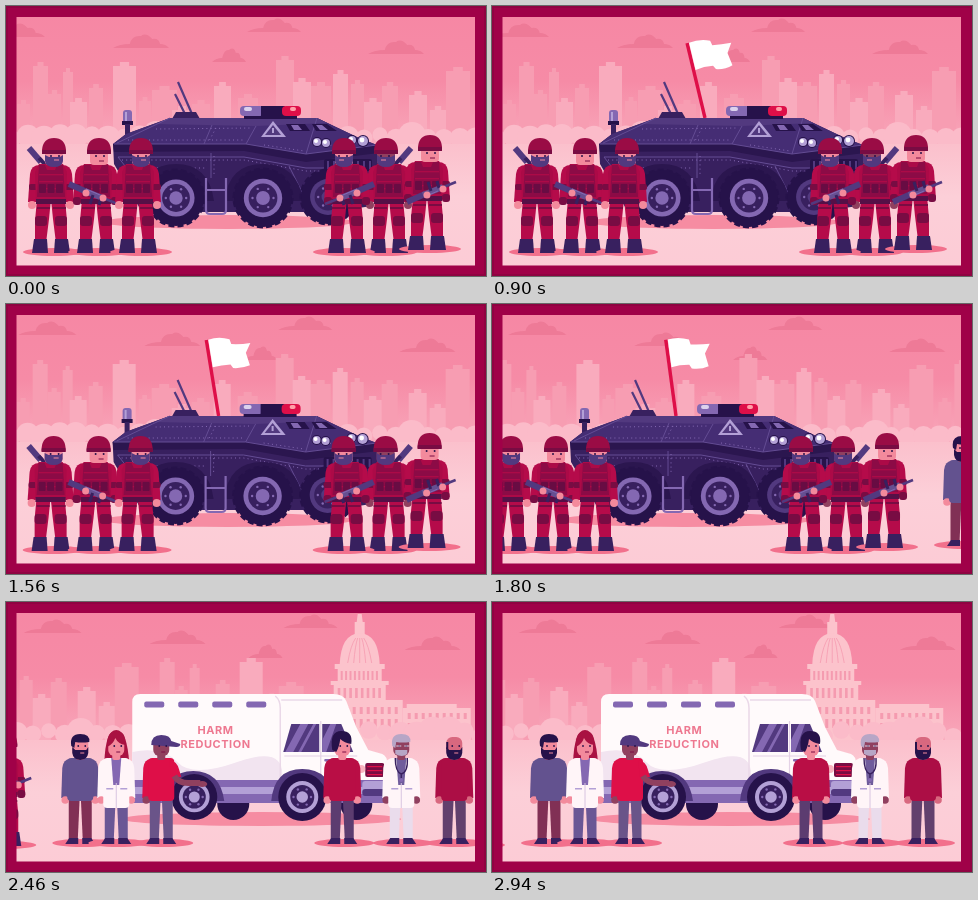
An HTML page that plays this animation: 480x270 px, repeating every 3 s.

```html
<!DOCTYPE html>
<html lang="en">
<head>
<meta charset="utf-8">
<title>Harm reduction</title>
<style>
html,body{margin:0;width:100%;height:100%;overflow:hidden;background:#a00148}
svg{display:block;width:100vw;height:100vh}
text{font:700 11px Inter,"Open Sans",sans-serif;letter-spacing:.55px;text-anchor:middle;fill:#ee7890}
</style>
</head>
<body>
<svg id="stage" viewBox="0 0 480 270"></svg>
<script>
const LOOP = 3000, STEP = 60, TRAVEL = 442;
const ink = '#26124a', navy = '#38205f', plum = '#52397f', mauve = '#8468b2', lilac = '#b3a0d6';
const wine = '#780c43', crimson = '#ac0a47', red = '#de0f48', skin = '#f38a9c', brown = '#90405f';

// Shape helpers
const rect = (x, y, w, h, f, rx = 0) => `<rect x="${x}" y="${y}" width="${w}" height="${h}" rx="${rx}" fill="${f}"/>`;
const path = (d, f) => `<path d="${d}" fill="${f}"/>`;
const line = (d, s, w = 1, more = '') => `<path d="${d}" fill="none" stroke="${s}" stroke-width="${w}" ${more}/>`;
const oval = (x, y, rx, ry, f) => `<ellipse cx="${x}" cy="${y}" rx="${rx}" ry="${ry}" fill="${f}"/>`;
const disc = (x, y, r, f) => oval(x, y, r, r, f);
const group = (body, at = '', id = '') => `<g ${id && `id="${id}"`} ${at && `transform="${at}"`}>${body}</g>`;
const times = (n, f) => Array.from({length: n}, (_, i) => f(i)).join('');

let seed = 7;
const rand = () => (seed = seed * 16807 % 2147483647) / 2147483647;

function cloud(x, y, w) {
  return path(`M${x - w / 2} ${y + 6}q${w * .12} -4 ${w * .3} -4q2 -9 ${w * .2} -8q5 -4 ${w * .2} 3q${w * .12} -1 ${w * .14} 5q${w * .1} 0 ${w * .16} 4z`, '#ee7a97');
}

function skyline() {
  const far = [[11, 98, 13], [27, 60, 15], [42, 88, 13], [57, 66, 10], [83, 82, 14], [133, 95, 12], [146, 84, 25],
    [186, 98, 18], [232, 92, 20], [270, 54, 18], [305, 80, 20], [345, 78, 13], [376, 80, 16], [440, 65, 24]];
  const near = [[64, 96, 17], [107, 60, 23], [166, 104, 20], [208, 80, 17], [287, 76, 18], [327, 68, 15], [358, 96, 18], [403, 89, 18], [424, 104, 16]];
  const row = (list, fill) => [0, 458].map(o => list.filter(b => b[0] + o < 640)
    .map(([x, y, w]) => rect(x + o, y, w, 150 - y, fill) + rect(x + o + w * .3, y - 4, w * .4, 5, fill)).join('')).join('');
  return row(far, '#f79db2') + row(near, '#f9abbd');
}

function capitol() {
  const pale = '#fcc3cc', shade = '#f59bb0';
  return path('M-2 12h4l1 8h2v13h-10v-13h2z', pale) + path('M-20 63q1 -31 20 -32q19 1 20 32z', pale) +
    times(5, i => line(`M${-12 + i * 6} 61Q${-9 + i * 4.5} 43 ${-4 + i * 2} 36`, shade, .8)) +
    rect(-25, 62, 50, 5, pale) + rect(-22, 67, 44, 13, pale) + times(9, i => rect(-19 + i * 4.4, 69, 2, 9, shade)) +
    rect(-29, 79, 58, 4, pale) + rect(-26, 83, 52, 16, pale) + times(8, i => rect(-22 + i * 5.8, 86, 2.6, 10, shade)) +
    rect(-39, 98, 82, 45, pale) + times(11, i => rect(-35 + i * 7, 105, 3, 7, shade) + rect(-35 + i * 7, 117, 3, 9, shade)) +
    rect(43, 106, 68, 37, pale) + rect(47, 102, 50, 4, pale) +
    times(9, i => rect(48 + i * 7, 111, 3, 6, shade) + rect(48 + i * 7, 121, 3, 6, shade));
}

function puffs() {
  return times(56, i => disc(i * 16 - 10, 135 - rand() * 7, 7 + rand() * 8, '#fbbbc9'));
}

function wheel(x, y, r, rim, knobs) {
  return (knobs ? `<circle cx="${x}" cy="${y}" r="${r - 1}" fill="none" stroke="${ink}" stroke-width="3" stroke-dasharray="6 3.1"/>` : '') +
    disc(x, y, r - 1, ink) + disc(x, y, r * .64, rim) + disc(x, y, r * .48, navy) + disc(x, y, r * .23, rim) +
    times(6, i => disc(x + r * .35 * Math.cos(i * 1.047), y + r * .35 * Math.sin(i * 1.047), 1.2, mauve));
}

function tank() {
  const edge = '#644c94', upper = '#452d74';
  const rivets = d => line(d, mauve, 1, 'stroke-dasharray="1 3.2"');
  const lamp = (x, y, r) => disc(x, y, r, ink) + disc(x, y, r - 1, lilac) + disc(x - 1, y - 1, r * .4, '#fff');
  return oval(222, 216, 126, 7, '#f68ca2') +
    group(line('M0 0V-77', red, 3.4) + '<path id="cloth" fill="#fff"/>', '', 'flag') +
    line('M186 108L172 76M179 108L169 88', plum, 2.2) + path('M166 113l4 -7h20l4 7z', navy) +
    rect(117, 104, 9, 13, mauve, 3) + rect(119, 106, 2, 9, lilac) + rect(116, 115, 11, 4, ink) + rect(119, 118, 5, 14, navy) +
    path('M107 138L120 128L164 112H311L353 132L371 139L374 152L366 200L325 206H136L108 158z', navy) +
    path('M107 138L120 128L164 112H311L353 132L371 139L300 148L240 138z', upper) +
    path('M164 112H311L321 117L250 120L150 118z', plum) +
    path('M107 138L240 138L300 148L371 139L373 147L300 156L238 145L108 146z', '#2b164f') +
    line('M108 138H240L300 148L371 139M164 112L147 120L111 137M250 120L240 138M300 148L311 112M206 119L198 138', edge) +
    line('M112 151H238L300 162H368M130 174L112 151M205 147V172M283 160L296 186H366', edge) +
    rivets('M122 134H238M150 123L246 122M258 139L298 145M210 122L203 135M316 140L360 136') +
    rivets('M116 154H238L300 165H366M208 150V170M130 162H200') +
    path('M267 115l13 16h-25z', lilac) + path('M267 119l8 10h-16z', plum) + rect(266, 122, 2, 5, lilac) +
    path('M280 118h19l5 7h-20zM306 118h15l10 7h-21z', ink) + path('M285 119h7l4 5h-8zM310 119h6l6 5h-8z', mauve) +
    lamp(311, 136, 5) + lamp(320, 137, 5) + lamp(346, 134, 5) + lamp(357, 135, 6) +
    rect(318, 153, 48, 12, ink, 2) + times(8, i => rect(321 + i * 6, 155, 2, 8, plum)) +
    rect(238, 109, 53, 4, ink) + rect(234, 100, 24, 10, mauve, 4) + rect(238, 101, 8, 4, '#dcd2ee', 2) +
    rect(255, 100, 24, 10, ink) + rect(276, 100, 19, 10, red, 4) + rect(284, 101, 6, 4, '#ff9fa8', 2) +
    path('M134 195q3 -37 36 -37t38 37zM219 195q3 -37 38 -37t40 37z', '#2b164f') +
    wheel(322, 191, 28, plum, 1) + wheel(170, 192, 29, mauve, 1) + wheel(257, 192, 30, mauve, 1) +
    line('M200 172V204Q200 208 204 208H216Q220 208 220 204V172M200 184H220', mauve, 2.2);
}

function gun() {
  return line('M-26 -10L-8 -2', plum, 6) + line('M-10 -3L10 5', '#664f91', 6) + line('M8 4L23 10', plum, 2.6) +
    line('M-2 1L-5 10M6 4L4 11', navy, 3) + line('M-9 -5L5 1', mauve, 1);
}

function soldier(x, pose, {beard, tone = skin, flip, y = -1}) {
  const sleeve = '#b50b4a', hang = pose === 'back' || !pose;
  const leg = s => path(`M0 194h${s * 14}l${s * 2} 22v22h${-s * 11}l${-s * 3} -24z`, sleeve) + rect(s * 10 - 6, 211, 12, 10, wine, 3) +
    rect(s * 8 - 6, 202, 13, 2, wine) + path(`M${s * 4} 234h${s * 13}l${s * 2} 14h${-s * 16}z`, navy);
  const arm = s => path(`M${s * 11} 160q${s * 9} 0 ${s * 10} 9l${s * 2} 28h${-s * 8}l${-s * 4} -25z`, sleeve) +
    rect(s * 18 - 4, 179, 9, 6, wine, 2) + (hang ? disc(s * 19, 200, 4, tone) : rect(s * 19 - 4, 192, 8, 8, wine, 3));
  const head = rect(-9, 144, 18, 16, tone, 4) + (beard ? path('M-9 150l4 2h11l3 -2v6q-1 6 -9 6t-9 -6z', plum) + line('M0 155h5', skin) : line('M0 156h5', wine)) +
    path('M-12 149v-4q1 -12 12 -12t12 12v4z', '#9a0c45') + rect(-12, 145, 24, 4, wine, 1) + disc(-3, 151, 1, ink) + disc(5, 151, 1, ink);
  const body = oval(3, 247, 31, 4, '#f2708c') +
    (pose === 'back' ? line('M-22 143L-10 157', plum, 6) + line('M-12 153L4 170', navy, 4) : '') +
    leg(-1) + leg(1) + arm(-1) + arm(1) +
    path('M-12 159h24l4 8l-1 32h-30l-1 -32z', crimson) + path('M-12 160h6l2 5h8l2 -5h6l2 32h-28z', '#8c0b46') +
    times(3, i => rect(-12, 169 + i * 7, 24, 1.3, crimson)) + times(3, i => rect(-12 + i * 8.5, 179, 7, 9, '#680c43', 1)) +
    rect(-15, 194, 30, 5, '#551047') + group(head, 'translate(3 0)') +
    (pose === 'low' ? group(gun(), 'translate(-1 189)') + disc(-10, 188, 3.5, tone) + disc(7, 193, 3.5, tone) : '') +
    (pose === 'high' ? group(gun(), 'translate(6 190) scale(1 -1)') + disc(0, 193, 3.5, tone) + disc(16, 187, 3.5, tone) : '');
  return group(body, `translate(${x} ${y})${flip ? ' scale(-1 1)' : ''}`);
}

function squad() {
  return soldier(45, 'back', {beard: 1}) + soldier(90, 'low', {}) + soldier(132, '', {beard: 1}) +
    soldier(383, 'back', {beard: 1, tone: brown, flip: 1}) + soldier(341, 'low', {beard: 1, flip: 1}) + soldier(421, 'high', {y: -4});
}

function van() {
  const white = '#fffafb', tint = '#f2e4f0';
  const pane = d => path(d, plum);
  return oval(238, 217, 140, 7, '#f68ca2') + disc(210, 202, 16, ink) + disc(333, 202, 16, ink) +
    path('M109 100q0 -8 8 -8H310q10 0 13 7l10 26l12 23l14 4q5 2 5 10v36H109z', white) +
    path('M109 150q30 -6 45 10t60 0t45 12V184H109z', tint) +
    line('M252 94q5 4 5 12V180', '#ead8e8', 1.5) + line('M258 98H319', '#ead8e8', 1.5) +
    times(4, i => rect(121 + i * 34, 99.5, 20, 6, mauve, 2)) +
    '<text x="192.3" y="132">HARM</text><text x="192.3" y="145.5">REDUCTION</text>' +
    pane('M268 122H296V150H260z') + pane('M299 122H318L330 150H299z') +
    path('M277 122h8l-15 28h-8zM290 122h3l-15 28h-3zM307 122h6l-10 28h-4v-12z', mauve) +
    line('M297.5 119V180M261 154H334', '#e4d2e6', 1.2) + rect(301, 157, 9, 2.5, mauve, 1) +
    rect(109, 178, 255, 7, mauve) + rect(109, 185, 255, 16, lilac, 2) + rect(109, 192, 255, 9, mauve, 2) +
    rect(342, 161, 19, 14, wine, 2) + times(3, i => rect(344, 164 + i * 4, 15, 1.2, red)) +
    rect(339, 179, 27, 14, lilac, 3) + rect(339, 187, 27, 7, plum, 3) + disc(338, 167, 4, '#f9b3bf') +
    path('M141 199q2 -30 29 -30t31 30zM248 199q3 -32 31 -32t33 32z', plum) +
    wheel(171, 195, 24, lilac) + wheel(279, 195, 25, lilac);
}

function person(x, o) {
  const top = o.top, hand = o.skin, coat = o.coat;
  const limb = s => path(`M${s * 10} 157q${s * 7} 0 ${s * 8} 9l${s * 1} 30h${-s * 7}l${-s * 3} -25z`, top) + disc(s * 15, 198, 3.8, hand);
  const leg = s => path(`M${s * .5} 194h${s * 11}v44h${-s * 9}z`, o.legs) + path(`M${s * 2} 236h${s * 9}l${s * 4} 6h${-s * 13}z`, navy);
  const body = oval(2, 241, 30, 4, '#f2708c') + (o.back || '') + leg(-1) + leg(1) + limb(-1) + (o.reach ? '' : limb(1)) +
    rect(-13, 156, 26, coat ? 50 : 43, top, 4) +
    (coat ? path('M-5 156h10l-2 27h-6z', coat) + line('M0 181V206', '#d8c4e0') + rect(-10, 186, 7, 1.5, lilac) + rect(4, 186, 7, 1.5, lilac) : '') +
    rect(-4, 150, 8, 8, hand, 2) + rect(-8, 135, 16, 19, hand, 6) + (o.hair || '') +
    disc(-2, 144, .9, ink) + disc(5, 144, .9, ink) + (o.beard ? '' : line('M0 150h4', wine)) + (o.extra || '');
  return group(body, `translate(${x} 0)`);
}

function crowd() {
  const cap = c => path('M-9 144q-2 -12 9 -12q10 0 9 8q-8 1 -14 0l-1 6z', c);
  const beard = c => path('M-8 145l3 3h11l2 -3v6q-1 7 -8 7t-8 -7z', c) + line('M0 151h4', skin);
  const scope = line('M-6 156q0 14 6 16q7 -2 6 -16M0 172v5', navy, 1.4) + disc(0, 178, 2, mauve);
  return person(57, {top: '#63528f', skin, legs: '#813055', beard: 1, hair: cap(ink) + beard(ink)}) +
    person(93, {top: '#fff5f8', coat: mauve, skin, legs: '#6a5795',
      back: path('M-12 162q1 -34 12 -34t13 34z', '#a91242'), hair: path('M-9 145q-1 -16 9 -16t9 14q-7 -1 -10 -7q-2 6 -8 9z', '#a91242')}) +
    person(138, {top: red, skin: brown, legs: '#6a5489', reach: 1, hair: path('M-10 143q0 -10 10 -10q9 0 10 6l9 3q0 3 -4 3z', plum),
      extra: path('M8 158q8 1 10 10l2 7h-10z', red) + line('M13 174Q17 181 27 181H39', brown, 6) + oval(41, 182, 5, 3, brown)}) +
    person(319, {top: '#b90e45', skin, legs: '#5c3c70', hair: path('M-10 148q-3 -19 9 -19q12 0 10 13q-7 -1 -11 -5q-1 8 -4 13z', ink)}) +
    person(378, {top: '#fff5f8', coat: '#705c9c', skin: brown, legs: '#eadcec', hair: cap('#b7a6c6') + path('M-6 148h12v4q-5 4 -12 0z', '#b7a6c6'),
      extra: scope + line('M-5 144h5m3 0h5', '#ddd0e6', 1), beard: 1}) +
    person(431, {top: '#ac0e45', skin: '#d8687f', legs: '#62406d', beard: 1, hair: path('M-8 140l2 0l0 7h-2z', ink) + beard(ink)});
}

const stage = document.getElementById('stage');
stage.innerHTML = `<defs>
  <linearGradient id="sky" x1="0" y1="0" x2="0" y2="1"><stop offset="0" stop-color="#f687a4"/><stop offset=".5" stop-color="#f68ba6"/><stop offset="1" stop-color="#f9adbe"/></linearGradient>
  <linearGradient id="ground" x1="0" y1="0" x2="0" y2="1"><stop offset="0" stop-color="#fbc0cc"/><stop offset=".4" stop-color="#fccfd8"/><stop offset="1" stop-color="#fccbd5"/></linearGradient>
  </defs>` +
  rect(0, 0, 480, 150, 'url(#sky)') +
  group(cloud(10, 25, 58) + cloud(135, 36, 56) + cloud(268, 20, 54) + cloud(223, 50, 34) + cloud(390, 42, 56), '', 'clouds') +
  group(skyline() + group(capitol(), 'translate(685 0)') + puffs(), '', 'city') +
  rect(0, 138, 480, 132, 'url(#ground)') +
  group(tank() + squad() + group(van() + crowd(), `translate(${TRAVEL} 0)`), '', 'scene') +
  path('M0 0H480V270H0zM10.5 11V259.5H469V11z', '#a00148') +
  line('M1 1H479V269H1z', '#900342', 2);

const [clouds, city, scene, flag, cloth] = ['clouds', 'city', 'scene', 'flag', 'cloth'].map(id => document.getElementById(id));
const clamp = v => Math.min(1, Math.max(0, v));
const inOut = p => p < .5 ? 4 * p ** 3 : 1 - (2 - 2 * p) ** 3 / 2;
const backOut = p => 1 + 2.2 * (p - 1) ** 3 + 1.2 * (p - 1) ** 2;
const shift = (el, x) => el.setAttribute('transform', `translate(${x.toFixed(2)} 0)`);

function draw(t) {
  const pan = TRAVEL * inOut(clamp((t - 1485) / 1240));
  shift(clouds, t * .02 - pan * .03);
  shift(city, -pan * .78);
  shift(scene, -pan);

  const rise = clamp((t - 300) / 480);
  const tilt = -10.5 + 3 * Math.cos((t - 1900) / 1900 * 2 * Math.PI);
  const w = 1.2 * Math.sin(t / 150);
  flag.setAttribute('visibility', rise ? 'visible' : 'hidden');
  flag.setAttribute('transform', `translate(213 112) rotate(${tilt.toFixed(2)}) translate(0 ${(100 * (1 - backOut(rise))).toFixed(2)})`);
  cloth.setAttribute('d', `M2 -77Q13 ${-78 + w} 23 -74L24 -69Q33 ${-68 - w} 43 -67L37 -58L39 -45Q31 ${-42 + w} 22 -45L20 -49Q11 ${-51 - w} 2 -49z`);
}

function tick() {
  draw(Math.floor(performance.now() % LOOP / STEP) * STEP);
  requestAnimationFrame(tick);
}
tick();
</script>
</body>
</html>
```
